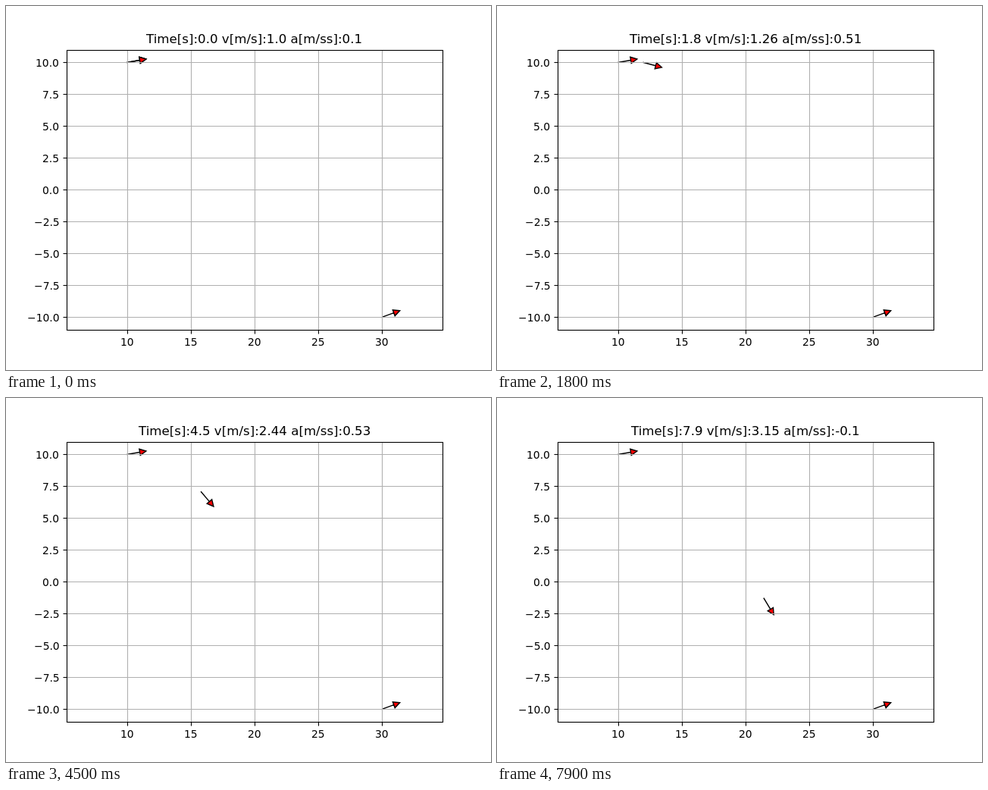
An HTML page with a canvas that plays this animation: 640 by 480 pixels, repeating every 8 s.

```html
<!DOCTYPE html>
<html>
<head>
<meta charset="utf-8">
<style>
html, body { margin: 0; width: 100%; height: 100%; overflow: hidden; background: #fff; }
canvas { display: block; }
</style>
</head>
<body>
<canvas id="stage" width="640" height="480"></canvas>
<script>
const ctx = document.getElementById('stage').getContext('2d');
const LEFT = 80, RIGHT = 576, TOP = 57.6, BOTTOM = 427.2;
const PT = 100 / 72;
const T = 15, STEP = 0.1, FRAMES = 80;
const rad = deg => deg * Math.PI / 180;

const start = { x: 10, y: 10, yaw: rad(10), v: 1, a: 0.1 };
const goal = { x: 30, y: -10, yaw: rad(20), v: 1, a: 0.1 };

// Quintic through given position, speed and acceleration at both ends
function quintic(p0, v0, a0, p1, v1, a1) {
  const d = p1 - p0 - v0 * T - a0 * T * T / 2;
  const e = (v1 - v0 - a0 * T) * T;
  const f = (a1 - a0) * T * T;
  const c3 = (10 * d - 4 * e + f / 2) / T ** 3;
  const c4 = (-15 * d + 7 * e - f) / T ** 4;
  const c5 = (6 * d - 3 * e + f / 2) / T ** 5;
  return t => ({
    p: p0 + v0 * t + a0 / 2 * t ** 2 + c3 * t ** 3 + c4 * t ** 4 + c5 * t ** 5,
    v: v0 + a0 * t + 3 * c3 * t ** 2 + 4 * c4 * t ** 3 + 5 * c5 * t ** 4,
    a: a0 + 6 * c3 * t + 12 * c4 * t ** 2 + 20 * c5 * t ** 3
  });
}

const axisPath = (key, dir) => quintic(
  start[key], start.v * dir(start.yaw), start.a * dir(start.yaw),
  goal[key], goal.v * dir(goal.yaw), goal.a * dir(goal.yaw));
const pathX = axisPath('x', Math.cos);
const pathY = axisPath('y', Math.sin);

function stateAt(t) {
  const x = pathX(t), y = pathY(t);
  return {
    x: x.p, y: y.p, yaw: Math.atan2(y.v, x.v),
    v: Math.hypot(x.v, y.v), a: Math.hypot(x.a, y.a)
  };
}

// Decimal text cut to four characters
function cut(n) {
  const s = String(+n.toPrecision(12));
  return (s.includes('.') ? s : s + '.0').slice(0, 4);
}

const snap = n => Math.floor(n + 0.5) + 0.5;

function line(x1, y1, x2, y2, color) {
  ctx.strokeStyle = color;
  ctx.lineWidth = 0.8 * PT;
  ctx.beginPath();
  ctx.moveTo(x1, y1);
  ctx.lineTo(x2, y2);
  ctx.stroke();
}

// align: 0.5 centres the text on x, 1 ends it there
function label(text, x, y, size, align) {
  ctx.font = size * PT + 'px "DejaVu Sans", sans-serif';
  ctx.fillStyle = '#000';
  ctx.fillText(text, Math.round(x - ctx.measureText(text).width * align), Math.round(y));
}

function arrow(x, y, yaw, scale) {
  ctx.save();
  ctx.translate(x, y);
  ctx.rotate(-yaw);
  const shaft = 0.0005 * scale, half = 0.25 * scale;
  ctx.beginPath();
  ctx.moveTo(1.5 * scale, 0);
  ctx.lineTo(scale, -half);
  ctx.lineTo(scale, -shaft);
  ctx.lineTo(0, -shaft);
  ctx.lineTo(0, shaft);
  ctx.lineTo(scale, shaft);
  ctx.lineTo(scale, half);
  ctx.closePath();
  ctx.fillStyle = '#f00';
  ctx.fill();
  ctx.strokeStyle = '#000';
  ctx.lineWidth = PT;
  ctx.stroke();
  ctx.restore();
}

function draw(i) {
  const t = i * STEP, now = stateAt(t);
  if (i > 0 && now.v < stateAt(t - STEP).v) now.a *= -1;

  // The view stretches when the vehicle rises above its start
  const high = Math.max(start.y, now.y), margin = (high - goal.y) * 0.05;
  const scale = (BOTTOM - TOP) / (high - goal.y + 2 * margin);
  const px = x => (LEFT + RIGHT) / 2 + (x - 20) * scale;
  const py = y => TOP + (high + margin - y) * scale;

  ctx.fillStyle = '#fff';
  ctx.fillRect(0, 0, 640, 480);

  for (const s of [start, goal, now]) arrow(px(s.x), py(s.y), s.yaw, scale);

  const l = snap(LEFT), r = snap(RIGHT), top = snap(TOP), b = snap(BOTTOM);
  for (let x = 10; x <= 30; x += 5) {
    const gx = snap(px(x));
    line(gx, top, gx, b, '#b0b0b0');
    line(gx, b, gx, b + 5, '#000');
    label(String(x), px(x), 448, 10, 0.5);
  }
  for (let y = -10; y <= 10; y += 2.5) {
    const gy = snap(py(y));
    line(l, gy, r, gy, '#b0b0b0');
    line(l - 5, gy, l, gy, '#000');
    label(y.toFixed(1).replace('-', '\u2212'), LEFT - 7 * PT, py(y) + 5.5, 10, 1);
  }

  ctx.strokeStyle = '#000';
  ctx.lineWidth = 0.8 * PT;
  ctx.strokeRect(l, top, r - l, b - top);

  label(`Time[s]:${cut(t)} v[m/s]:${cut(now.v)} a[m/ss]:${cut(now.a)}`,
    (LEFT + RIGHT) / 2, 49, 12, 0.5);
}

const began = performance.now();
function tick() {
  draw(Math.floor((performance.now() - began) / 100) % FRAMES);
  requestAnimationFrame(tick);
}
tick();
</script>
</body>
</html>
```
